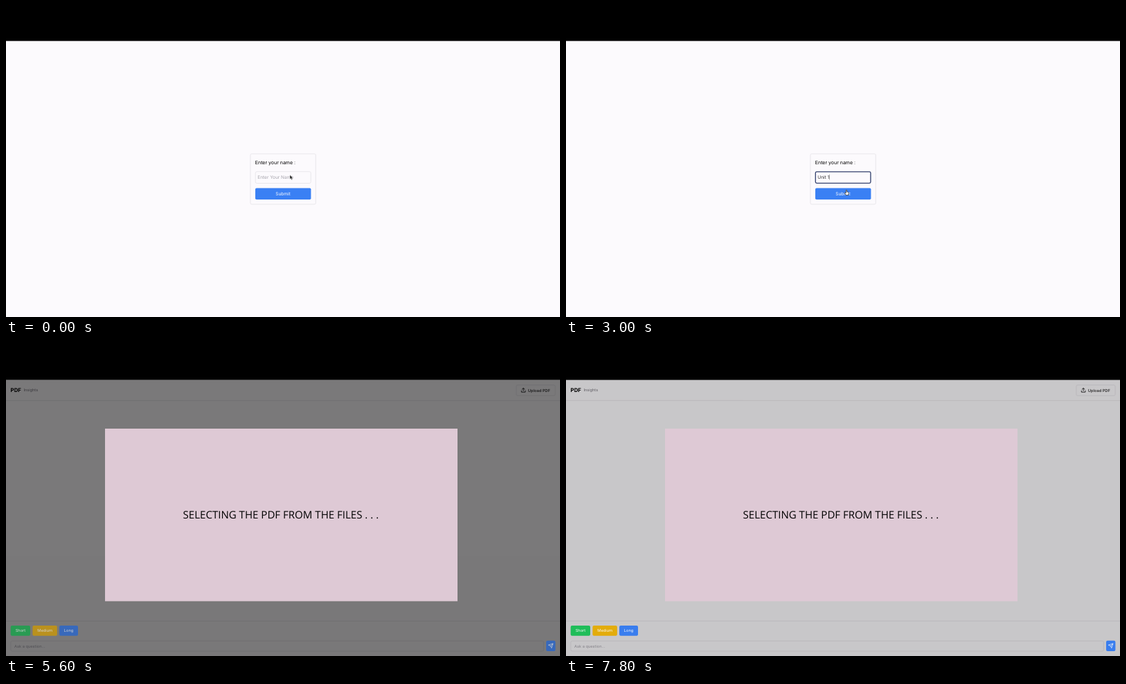
Write an HTML page that moves like this. It is 800 px wide and 450 px high and loops after 8000 ms.

```html
<!DOCTYPE html>
<html lang="en">
<head>
<meta charset="utf-8">
<title>PDF Insights</title>
<style>
html, body { margin: 0; width: 100%; height: 100%; overflow: hidden; background: #fcfafd; }
svg { display: block; width: 100vw; height: 100vh; }
text { font-family: Inter, sans-serif; text-rendering: geometricPrecision; white-space: pre; }

.line { fill: none; stroke: #e5e3e8; stroke-width: .8; }
.small { font-size: 5.7px; }
.body { font-size: 6.5px; }
.muted { fill: #a5a3ab; }
.white { fill: #fff; }
.mid { text-anchor: middle; }
.icon { fill: none; stroke-width: .9; stroke-linecap: round; stroke-linejoin: round; }

/* One 8 s timeline; every change is a hard step. */
.login, .app, .placeholder, .focus, .caret, .popup, .more, .cursor, .arrow, .hand, .hover, .shade, .card, .buttons {
  animation: 8s step-end infinite;
}
.login { animation-name: login; }
.app { animation-name: app; }
.placeholder { animation-name: placeholder; }
.focus, .caret { animation-name: focus; }
.popup { animation-name: popup; }
.more { animation-name: more; }
.popup .panel { animation: panel 8s step-end infinite; }
.cursor { animation-name: move; }
.arrow { animation-name: arrow; }
.hand { animation-name: hand; }
.hover { animation-name: hover; }
.shade { animation-name: shade; }
.card { animation-name: card; }
.buttons { animation-name: buttons; }
.key { font-size: 0; animation: key 8s step-end calc(1.6s + var(--i) * .2s) infinite; }

@keyframes login { 0% { visibility: visible } 47.5%, 100% { visibility: hidden } }
@keyframes app { 0% { opacity: 0 } 47.5%, 100% { opacity: 1 } }
@keyframes placeholder { 0% { opacity: 1 } 20%, 100% { opacity: 0 } }
@keyframes focus { 0% { opacity: 0 } 5% { opacity: 1 } 42.5%, 100% { opacity: 0 } }
@keyframes popup { 0% { opacity: 0 } 7.5% { opacity: 1 } 37.5%, 100% { opacity: 0 } }
@keyframes more { 0% { opacity: 1 } 20%, 100% { opacity: 0 } }
@keyframes panel { 0% { height: 63.5px } 20%, 100% { height: 18px } }
@keyframes key { 0% { font-size: 6.5px } 50%, 100% { font-size: 0 } }
@keyframes move {
  0% { transform: translate(410px, 244.5px) }
  37.5% { transform: translate(405px, 266px) }
  40% { transform: translate(399px, 273px) }
  55% { transform: translate(430px, 255px) }
  57.5% { transform: translate(520px, 202px) }
  60% { transform: translate(640px, 131px) }
  62.5% { transform: translate(722px, 83px) }
  65%, 100% { transform: translate(746.5px, 66px) }
}
@keyframes arrow {
  0% { opacity: 1 } 20% { opacity: 0 } 47.5% { opacity: 1 } 65%, 100% { opacity: 0 }
}
@keyframes hand {
  0% { opacity: 0 } 37.5% { opacity: 1 } 47.5% { opacity: 0 } 65% { opacity: 1 } 70%, 100% { opacity: 0 }
}
@keyframes hover { 0% { fill: #fcfafd } 65% { fill: #f4f3f7 } 70%, 100% { fill: #fcfafd } }
@keyframes shade { 0% { opacity: 0 } 70% { opacity: .52 } 97.5%, 100% { opacity: .205 } }
@keyframes card { 0% { opacity: 0 } 70%, 100% { opacity: 1 } }
@keyframes buttons {
  0% { filter: none } 70% { filter: brightness(.83) saturate(.85) } 97.5%, 100% { filter: brightness(.98) }
}
</style>
</head>
<body>
<svg viewBox="0 0 800 450" preserveAspectRatio="none">
  <rect width="800" height="450" fill="#fcfafd"/>

  <g class="login">
    <rect class="line" x="352.9" y="213.9" width="94.4" height="73" rx="2"/>
    <text x="359.8" y="229.2" font-size="7">Enter your name :</text>
    <rect class="line" x="360.2" y="239.7" width="80" height="16.8" rx="2"/>
    <text class="body muted placeholder" x="363.3" y="250.4">Enter Your Name</text>
    <rect class="focus" x="360.3" y="239.8" width="79.6" height="16.6" rx="1.8" fill="none" stroke="#34426f" stroke-width="1.3"/>
    <text class="body" x="363.3" y="250.4" fill="#333"><tspan class="key" style="--i:0">U</tspan><tspan class="key" style="--i:1">n</tspan><tspan class="key" style="--i:2">i</tspan><tspan class="key" style="--i:3">t</tspan><tspan class="key" style="--i:4"> </tspan><tspan class="key" style="--i:5">1</tspan><tspan class="caret" dx="-.7" font-weight="300">|</tspan></text>
    <rect x="360" y="263.4" width="80.4" height="16.6" rx="1.8" fill="#3a80f4"/>
    <text class="body white mid" x="400" y="274.1">Submit</text>
    <g class="popup">
      <path d="M395.5 261.5 L399.8 257.2 L404 261.5z" fill="#1f1c21"/>
      <rect class="panel" x="391" y="260.8" width="65.2" height="18" rx="2.6" fill="#1f1c21"/>
      <g class="small white" font-weight="600">
        <text x="395.9" y="271.7">Unit 1</text>
        <g class="more">
          <text x="395.9" y="286.9">Test</text>
          <text x="395.9" y="302.1">Demo</text>
          <text x="395.9" y="317.3">Guest</text>
        </g>
      </g>
    </g>
  </g>

  <g class="app">
    <path class="line" d="M0 80.4H800M0 399.4H800"/>
    <text x="6.6" y="68.2" font-size="7.8" font-weight="700">PDF</text>
    <text x="25.5" y="67.4" font-size="5.6" fill="#77757d">Insights</text>
    <rect class="line hover" x="736.9" y="57.9" width="56.2" height="15.4" rx="2"/>
    <path class="icon" stroke="#222" d="M744.3 66.3v1.9h5.6v-1.9M747.1 66.2v-3.8M745.3 64.1l1.8-1.8 1.8 1.8"/>
    <text class="small" x="753.8" y="67.5" font-weight="500" fill="#222">Upload PDF</text>
    <rect class="line" x="6.9" y="428.2" width="769.5" height="14.8" rx="2"/>
    <text class="small muted" x="12" y="437.6">Ask a question...</text>
    <rect class="shade" y="50.6" width="800" height="400"/>
    <g class="buttons">
      <rect x="6.7" y="406" width="28.3" height="14.7" rx="2" fill="#20c15b"/>
      <rect x="38.4" y="406" width="35.5" height="14.7" rx="2" fill="#e8af0b"/>
      <rect x="77" y="406" width="27" height="14.7" rx="2" fill="#3a80f3"/>
      <g class="small white mid">
        <text x="20.9" y="415.4">Short</text>
        <text x="56.1" y="415.4">Medium</text>
        <text x="90.5" y="415.4">Long</text>
      </g>
      <rect x="780" y="427.8" width="13.4" height="15.2" rx="2" fill="#3a80f3"/>
      <path class="icon" stroke="#fff" style="stroke-width:.7" d="M789.8 432.3l-2 6.2-1.3-2.9-2.9-1.3zM789.8 432.3l-3.3 3.3"/>
    </g>
    <g class="card">
      <rect x="143" y="121" width="509" height="249.7" fill="#dec9d5"/>
      <text x="255.6" y="251" font-size="15.05" style="font-family:'Open Sans',sans-serif">SELECTING THE PDF FROM THE FILES . . .</text>
    </g>
  </g>

  <g class="cursor">
    <path class="arrow" d="M0 0v6l1.4-1.2 1 2.3 1.1-.5-1-2.2h1.9z" fill="#111" stroke="#fff" stroke-width=".4"/>
    <path class="hand" d="M-.7 .6q.7-1 1.4 0v2.2l2.2.7q.6.3.5 1l-.5 3.1h-3.6l-2-3q.3-.9 1.2-.3l.8.7z" fill="#fff" stroke="#222" stroke-width=".7"/>
  </g>
  <rect width="800" height="50.6"/>
</svg>
</body>
</html>
```
